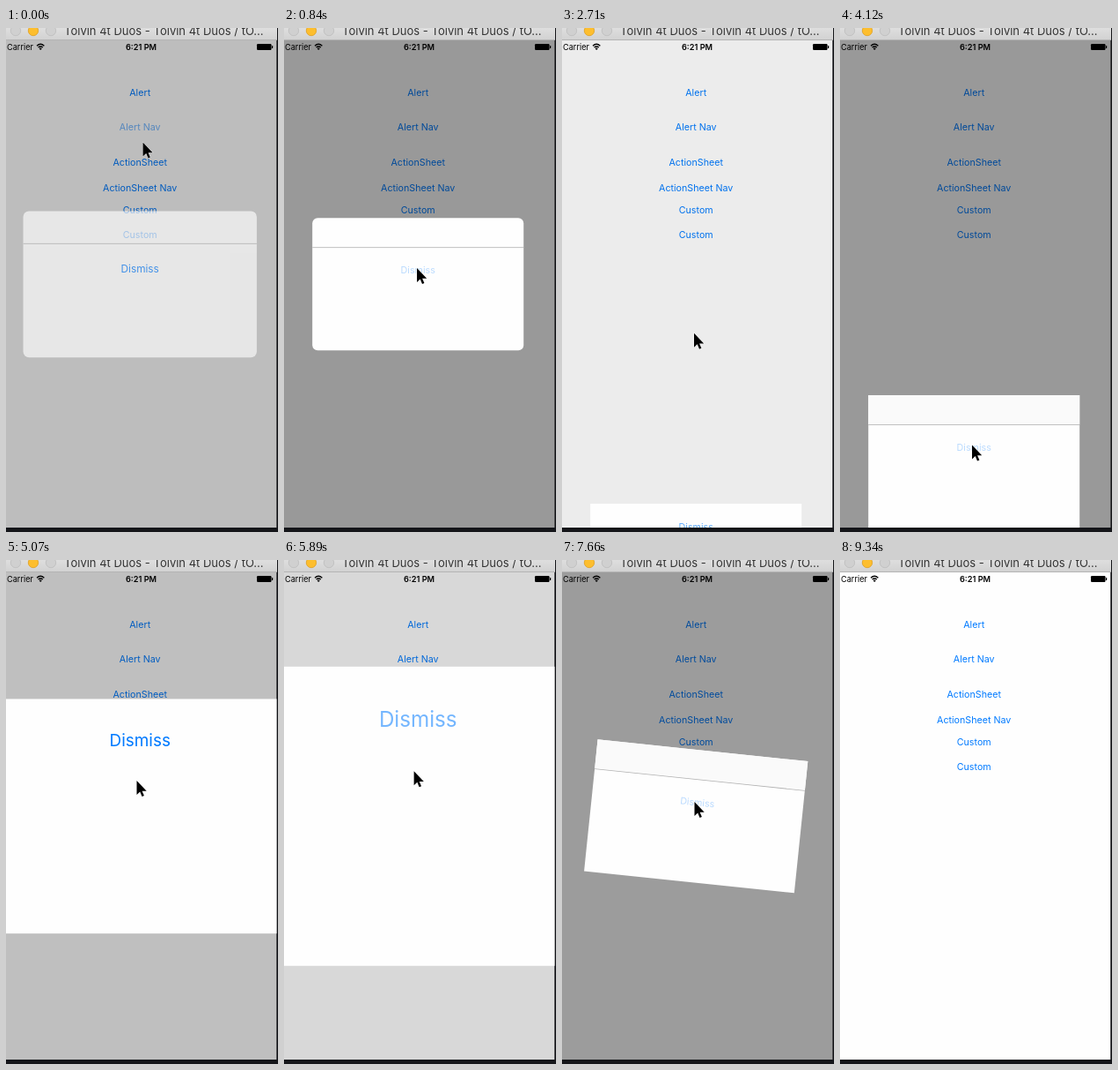
These frames come from a looping animation (309x571 px, 9.58 s). An HTML page:

```html
<!DOCTYPE html>
<html lang="en">
<head>
<meta charset="utf-8">
<title>Popup styles</title>
<style>
  html, body { margin: 0; width: 100%; height: 100%; overflow: hidden; background: #141519; }
  svg { display: block; width: 309px; height: 571px; }
  text { font-family: Inter, Roboto, sans-serif; }
  .button { font-size: 10.7px; fill: #007aff; text-anchor: middle; }
</style>
</head>
<body>
<svg viewBox="0 0 309 571">
  <defs>
    <clipPath id="screenClip"><rect y="14" width="307.5" height="552"/></clipPath>
    <linearGradient id="chrome" x2="0" y2="1">
      <stop stop-color="#dedede"/><stop offset="1" stop-color="#d2d2d2"/>
    </linearGradient>
  </defs>
  <rect width="309" height="571" fill="#141519"/>

  <rect width="308" height="13" fill="url(#chrome)"/>
  <rect y="13" width="308" height="1" fill="#b4b4b4"/>
  <g stroke-width=".8">
    <circle cx="11" cy="3" r="5.7" fill="#d0d0d0" stroke="#bdbdbd"/>
    <circle cx="31" cy="3" r="5.7" fill="#fdbe2e" stroke="#dfa023"/>
    <circle cx="51" cy="3" r="5.7" fill="#d0d0d0" stroke="#bdbdbd"/>
  </g>
  <text x="66" y="8" font-size="13" fill="#333">Tolvin 4t Duos - Tolvin 4t Duos / tO...</text>

  <g clip-path="url(#screenClip)">
    <rect y="14" width="307.5" height="552" fill="#fefefe"/>
    <g id="menu"></g>
    <rect id="dim" y="14" width="307.5" height="552"/>
    <g font-size="9.2">
      <text x="1" y="25">Carrier</text>
      <text x="153.5" y="25" font-weight="600" text-anchor="middle">6:21 PM</text>
      <g fill="none" stroke="#000" stroke-width="1.3">
        <path d="M35 20.2Q39.2 16.4 43.4 20.2M36.6 22.1Q39.2 19.8 41.8 22.1"/>
      </g>
      <path d="M37.6 23.2Q39.2 22 40.8 23.2L39.2 25Z"/>
      <rect x="285" y="18" width="16.5" height="7" rx="1.2"/>
      <rect x="302" y="20" width="1.2" height="3" rx=".6"/>
    </g>
    <g id="card">
      <rect id="panel" x="-120" y="-75" width="240" height="150" fill="#fefefe"/>
      <g id="navBar">
        <rect x="-120" y="-75" width="240" height="33" fill="#fafafa"/>
        <rect x="-120" y="-42" width="240" height=".8" fill="#b2b2b2"/>
      </g>
      <text id="dismiss" class="button">Dismiss</text>
    </g>
  </g>
  <path id="cursor" d="M0 0V16L3.7 12.6L6 18L8.4 17L6.1 11.7H11.2Z" stroke="#fff" stroke-width="1" paint-order="stroke"/>
</svg>
<script>
const LOOP = 9580, STEP = 117.9, DURATION = 400;
const el = id => document.getElementById(id);
const clamp = x => Math.max(0, Math.min(1, x));
const lerp = (a, b, p) => a + (b - a) * p;
const smooth = x => { x = clamp(x); return x * x * (3 - 2 * x); };

const labels = [
  ['Alert', 73], ['Alert Nav', 111.5], ['ActionSheet', 152],
  ['ActionSheet Nav', 180.5], ['Custom', 205.5], ['Custom', 234]
].map(([name, y]) => {
  const text = document.createElementNS('http://www.w3.org/2000/svg', 'text');
  text.textContent = name;
  text.setAttribute('class', 'button');
  text.setAttribute('x', 152.2);
  text.setAttribute('y', y + 4);
  el('menu').append(text);
  return text;
});

const popups = [
  { style: 'alert', nav: true, button: 1, open: -240, close: 900 },
  { style: 'sheet', nav: false, button: 2, open: 1557, close: 2420 },
  { style: 'sheet', nav: true, button: 3, open: 3400, close: 4126 },
  { style: 'zoom', nav: false, button: 4, open: 4839, close: 5660 },
  { style: 'spin', nav: true, button: 5, open: 6825, close: 7620 }
];

// Pointer stops: time, x, y
const stops = [
  [0, 155.5, 129.5], [160, 155, 132], [800, 151, 272], [960, 151, 272],
  [1480, 149, 151.5], [1700, 149, 151.5], [2300, 150, 440], [2480, 150, 440],
  [3050, 150, 179], [3420, 150, 179], [4000, 150, 472.5], [4180, 150, 472.5],
  [4720, 148, 204], [4860, 148, 206], [5070, 148.5, 250], [5300, 149, 241],
  [5720, 149, 241], [6360, 141.5, 231.5], [6840, 141.5, 231.5],
  [7450, 150.5, 274], [7680, 150.5, 274], [8250, 153.5, 154], [8842, 153.5, 154],
  [8960, 201.5, 447], [9078, 207.5, 517], [9196, 235.5, 556], [9314, 250, 600]
];

function pointerAt(t) {
  const i = stops.findIndex(s => s[0] > t);
  if (i < 0) return stops[stops.length - 1].slice(1);
  const [t0, x0, y0] = stops[i - 1], [t1, x1, y1] = stops[i];
  const p = smooth((t - t0) / (t1 - t0));
  return [lerp(x0, x1, p), lerp(y0, y1, p)];
}

// Opacity of a tapped label around the start of its action
function tapOpacity(t, start) {
  const age = t - start;
  return age < -100 ? 1 : lerp(0.27, 1, clamp((age - 80) / 420));
}

function drawCard({ style, nav }, p) {
  const y = style === 'sheet' ? lerp(641, 491, p) : 290.3;
  const scale = style === 'alert' ? lerp(1.3, 1, p) : style === 'zoom' ? lerp(3, 1, p) : 1;
  const angle = style === 'spin' ? lerp(180, 0, p) : 0;
  el('card').setAttribute('transform', `translate(152.2 ${y}) rotate(${angle}) scale(${scale})`);
  el('card').setAttribute('opacity', style === 'alert' ? p : 1);
  el('panel').setAttribute('rx', style === 'alert' ? 6 : 0);
  el('navBar').setAttribute('visibility', nav && style !== 'alert' ? 'visible' : 'hidden');
  el('alertLine').setAttribute('visibility', nav && style === 'alert' ? 'visible' : 'hidden');
  el('dismiss').setAttribute('y', nav ? -12 : -45);
}

const alertLine = el('navBar').lastElementChild.cloneNode();
alertLine.id = 'alertLine';
el('card').insertBefore(alertLine, el('dismiss'));

function render(time) {
  const t = Math.floor((time + 12) / STEP) * STEP;
  const popup = popups.find(({ open, close }) => t >= open && t < close + DURATION);
  const p = popup ? smooth((t - popup.open) / DURATION) * (1 - smooth((t - popup.close) / DURATION)) : 0;

  el('card').setAttribute('display', popup ? 'inline' : 'none');
  el('dim').setAttribute('opacity', 0.4 * p);
  if (popup) {
    drawCard(popup, p);
    el('dismiss').setAttribute('opacity', tapOpacity(t, popup.close));
  }
  for (const { button, open } of popups) {
    labels[button].setAttribute('opacity', tapOpacity(t, open));
  }
  el('cursor').setAttribute('transform', `translate(${pointerAt(t)})`);
}

const began = performance.now();
function tick() {
  render((performance.now() - began) % LOOP);
  requestAnimationFrame(tick);
}
render(0);
requestAnimationFrame(tick);
</script>
</body>
</html>
```
